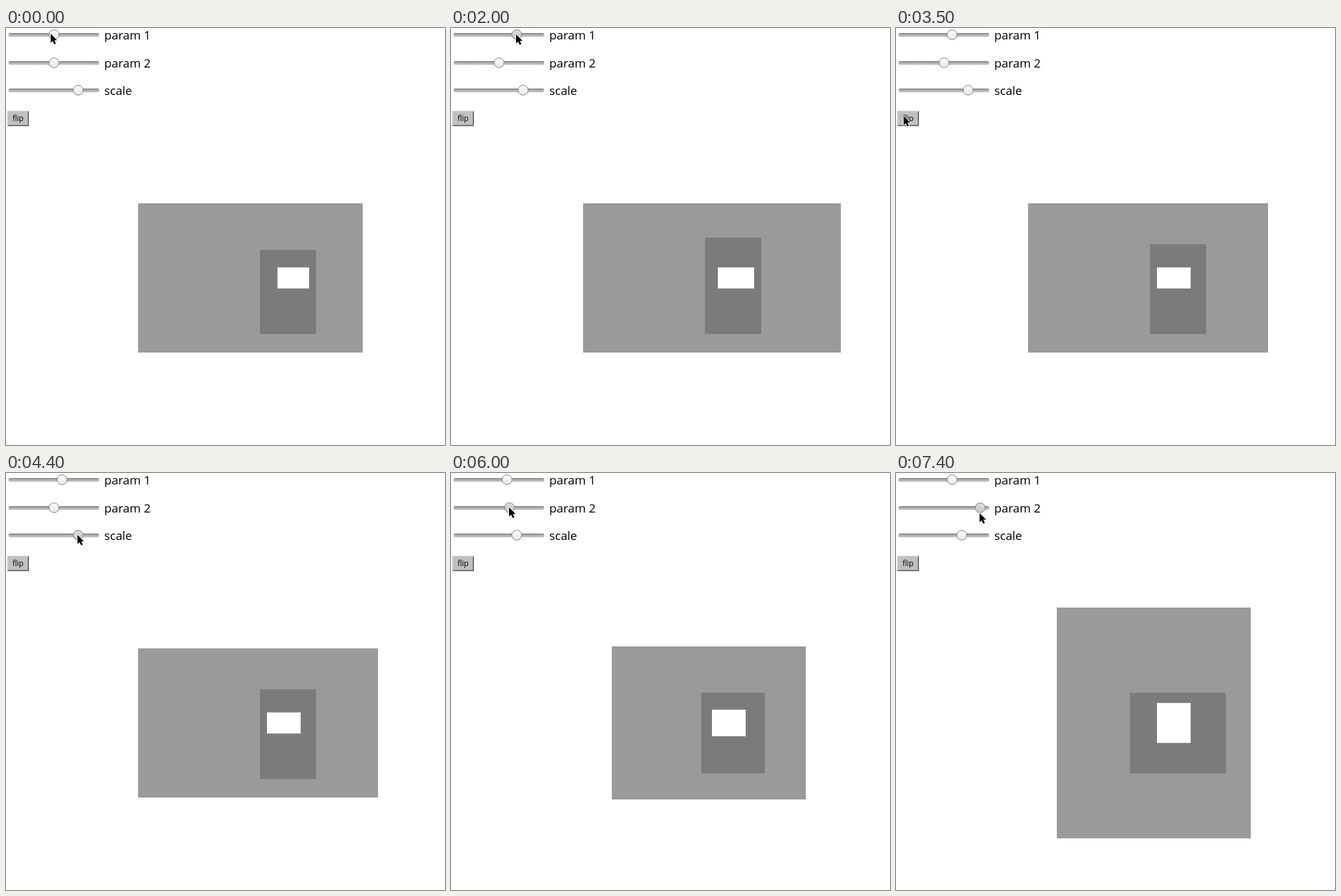
Recreate the animation shown at these times as an HTML page. Size 688 px wide and 654 px high, loop 7.5 s.

```html
<!DOCTYPE html>
<html lang="en">
<head>
<meta charset="utf-8">
<title>Nested rectangles</title>
<style>
  html, body { margin: 0; width: 100%; height: 100%; overflow: hidden; background: #fff; }
  svg { display: block; }
  text { font-family: "Open Sans", "Noto Sans", sans-serif; fill: #000; }
  .label { font-size: 18.8px; }
  .caption { font-size: 11.8px; }
  .knob { fill: url(#knob); stroke: #7c7c7c; }
  .knob.held { fill: url(#held); }
</style>
</head>
<body>
<svg width="688" height="654" viewBox="0 0 688 654">
  <defs>
    <linearGradient id="track" x2="0" y2="1">
      <stop offset="0" stop-color="#6e6e6e"/>
      <stop offset=".4" stop-color="#b0b0b0"/>
      <stop offset="1" stop-color="#c0c0c0"/>
    </linearGradient>
    <linearGradient id="knob" x2="0" y2="1">
      <stop offset="0" stop-color="#fff"/>
      <stop offset="1" stop-color="#e6e6e6"/>
    </linearGradient>
    <linearGradient id="held" x2="0" y2="1">
      <stop offset="0" stop-color="#dedede"/>
      <stop offset="1" stop-color="#c6c6c6"/>
    </linearGradient>
  </defs>

  <rect id="outer" fill="#9a9a9a" shape-rendering="crispEdges"/>
  <rect id="middle" fill="#7b7b7b"/>
  <rect id="inner" fill="#fff"/>

  <g id="sliders"></g>

  <g>
    <rect x="2" y="130" width="34" height="24" fill="#c0c0c0"/>
    <path id="light" d="M2 154V130H36L34 132H4V152Z"/>
    <path id="dark" d="M36 130V154H2L4 152H34V132Z"/>
    <text class="caption" x="10.3" y="146">flip</text>
  </g>

  <path id="cursor" d="M0 0V14.2L3.3 11.2L5.6 16.4L8.2 15.3L5.9 10.2H10.2Z"
        fill="#000" stroke="#fff" stroke-width="1.6" stroke-linejoin="round" paint-order="stroke"/>
</svg>
<script>
const LOOP = 7500, STEP = 100;
const CX = 442, CY = 392, HALF = 33;
const PRESS = 3000, FLIP = 3100;
const $ = id => document.getElementById(id);

// Stops are [time, value]; the hand eases from one to the next.
const param1 = { name: "param 1", y: 10.5, sag: 0,
  stops: [[200, .5], [500, .48], [1800, .78], [2300, .6]] };
const param2 = { name: "param 2", y: 54.5, sag: 45,
  stops: [[5500, .5], [6600, .8], [6900, .83], [7400, .95]] };
const scale = { name: "scale", y: 97.5, sag: 0,
  stops: [[4300, .8], [4400, .8], [4650, .64], [5200, .72]] };
const sliders = [param1, param2, scale];

const ease = f => (1 - Math.cos(Math.PI * f)) / 2;
const mix = (a, b, f) => a + (b - a) * f;
const knobX = value => 12 + 126 * value;

function valueAt({ stops }, t) {
  const i = stops.findIndex(([time]) => time > t);
  if (i < 0) return stops[stops.length - 1][1];
  if (i === 0) return stops[0][1];
  const [t0, v0] = stops[i - 1], [t1, v1] = stops[i];
  return Math.round(mix(v0, v1, ease((t - t0) / (t1 - t0))) * 100) / 100;
}

const rest = (from, to, x, y) => ({ from, to, at: () => [x, y] });

// The pointer rides along with a slider; sag lets it drift below the track.
function drag(s) {
  const [from, first] = s.stops[0];
  const to = s.stops[s.stops.length - 1][0];
  s.isHeld = t => t > from && t <= to;
  const at = t => {
    const v = valueAt(s, t);
    return [knobX(v), s.y - .5 + s.sag * (v - first) ** 2];
  };
  return { from, to, at };
}

const visits = [rest(0, 0, 70, 9), drag(param1), rest(2600, 3800, 12, 138), drag(scale), drag(param2)];

function pointer(t) {
  const i = visits.findIndex(v => v.to >= t);
  if (i < 0) return visits[visits.length - 1].at(t);
  const next = visits[i];
  if (t >= next.from) return next.at(t);
  const last = visits[i - 1];
  const f = ease((t - last.to) / (next.from - last.to));
  const goal = next.at(next.from);
  return last.at(last.to).map((v, axis) => mix(v, goal[axis], f));
}

function add(parent, tag, attrs) {
  const el = document.createElementNS("http://www.w3.org/2000/svg", tag);
  for (const key in attrs) el.setAttribute(key, attrs[key]);
  return parent.appendChild(el);
}

function place(id, x, y, width, height) {
  const attrs = { x, y, width, height };
  for (const key in attrs) $(id).setAttribute(key, attrs[key]);
}

for (const s of sliders) {
  const g = $("sliders");
  add(g, "rect", { x: 4, y: s.y - 2.5, width: 142, height: 5.8, rx: 2.5, fill: "url(#track)" });
  s.knob = add(g, "circle", { cy: s.y, r: 7.7, class: "knob" });
  add(g, "text", { x: 154, y: s.y + 7.5, class: "label" }).textContent = s.name;
}

function draw(t) {
  const [p1, p2, zoom] = sliders.map(s => {
    const value = valueAt(s, t);
    s.knob.setAttribute("cx", knobX(value) + .3);
    s.knob.classList.toggle("held", s.isHeld(t));
    return value;
  });

  // Every level turns a quarter and grows by k.
  const w = HALF * (1 + p1), h = 2 * HALF * p2;
  const k = zoom * 10 / 3, k2 = k * k;
  place("inner", t >= FLIP ? CX - HALF : CX + HALF - w, CY - h / 2, w, h);
  place("middle", CX - h * k / 2, CY + (HALF - w) * k, h * k, w * k);
  place("outer", CX - HALF * k2, CY - h * k2 / 2, w * k2, h * k2);

  const down = t >= PRESS && t < FLIP;
  $("light").setAttribute("fill", down ? "#707070" : "#c6c6c6");
  $("dark").setAttribute("fill", down ? "#c6c6c6" : "#707070");
  $("cursor").setAttribute("transform", `translate(${pointer(t).map(Math.floor)})`);
}

const start = performance.now();
function tick() {
  const t = (performance.now() - start) % LOOP;
  draw(Math.floor(t / STEP) * STEP);
  requestAnimationFrame(tick);
}
tick();
</script>
</body>
</html>
```
